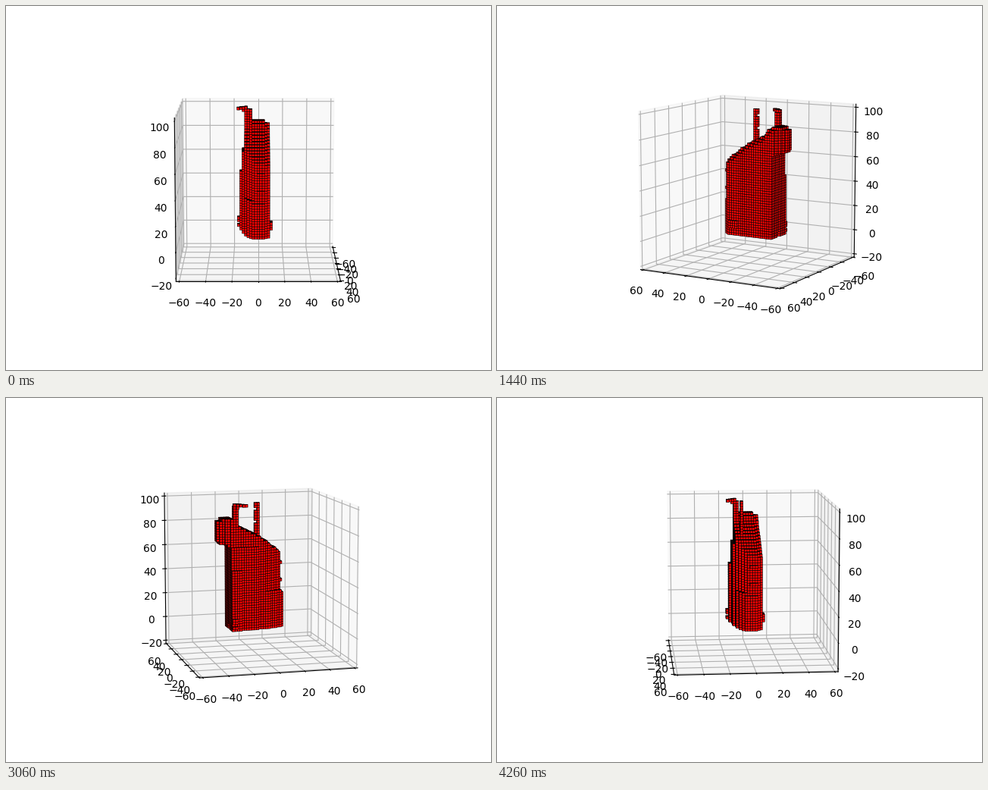
Recreate the animation shown at these times as a matplotlib script. Size 640 by 480 pixels, loop 4.32 s.

```python
import numpy as np
import matplotlib.pyplot as plt
from matplotlib.animation import FuncAnimation
from mpl_toolkits.mplot3d.art3d import Poly3DCollection

FRAMES, INTERVAL = 72, 60
ELEV = 10
HALF = 62.5          # half of the visible range, with a small margin
MID = np.array([0, 0, 40])
EYE_DIST = 1200


def build_solid():
    """Boolean grid of 2-unit cubes centred on even coordinates."""
    x, y, z = np.mgrid[-40:26:2, -22:18:2, -2:108:2]

    # Main body: sloped shoulder, tapered front
    top = np.interp(x, [-24, -20, -17, -11, -7, -2, 5, 13, 18],
                    [89, 86.5, 82, 79, 77, 74.5, 69.5, 63.5, 60])
    top = top - 2 * (y >= 6) - 2 * (y >= 8)
    low = np.interp(x, [-24, -10, 4, 12, 18], [-15, -13, -11, -9, -5])
    low = low + np.where(z > 30, 4 * np.clip(x / 16, 0, 1), 0)
    low = np.maximum(low, np.select([z < 50, z < 67], [-15, -13], -11))
    high = np.interp(x, [14, 16, 18], [9, 7, 5])
    front = np.where((z <= 28) | (z == 38) | (z == 52), 18, 16)
    body = ((x >= -24) & (x <= front) & (z > 0) & (z < top)
            & (y > low) & (y < high))
    body &= ~((x <= -8) & (z <= 4) & ((y == -4) | (y == -2)))

    # Head sticking out at the back
    roof = np.interp(x, [-34, -30], [87, 89]) - 2 * (y >= 6)
    floor = np.interp(x, [-34, -32, -28, -26], [71, 69, 69, 67])
    head = ((x >= -34) & (x < -24) & (z > floor) & (z < roof)
            & (y < np.interp(x, [-34, -25], [2, 9]))
            & (y > np.interp(x, [-34, -32, -26], [-5, -7, -9])))

    # Two posts and the diagonal hook on top
    thin = ((x == -2) | ((x == -4) & (z % 10 != 6))) & (y == -6)
    thin &= (z > 70) & (z <= 100)
    thick = ((x == -22) | (x == -20)) & ((y == -10) | (y == -8))
    thick &= (z > 76) & (z <= 98)
    step = (x + 22) // 2 + (y + 10) // 2
    hook = ((z == 100) & (x >= -22) & (x <= -14) & (y >= -16) & (y <= -10)
            & ((step == 0) | (step == 1)))
    hook |= (z == 98) & (x == -20) & (y == -12)

    # Loose cubes on the sides
    bumps = (y == 10) & (x >= 6) & (x <= 12) & (z >= 8) & (z <= 13)
    bumps |= ((y == -16) & (x <= -22) & (x >= -24)
              & ((z == 4) | (z == 8) | (z == 10)))

    return np.stack([x, y, z], -1), body | head | thin | thick | hook | bumps


def build_faces(points, solid):
    """Outer faces of the solid: quads, their centres and normals."""
    quads, centers, normals = [], [], []
    for axis in range(3):
        u, v = np.delete(np.eye(3), axis, 0)
        corners = np.array([-u - v, u - v, u + v, v - u])
        for side in (-1, 1):
            normal = side * np.eye(3)[axis]
            open_side = solid & ~np.roll(solid, -side, axis)
            mid = points[open_side] + normal
            centers.append(mid)
            quads.append(mid[:, None] + corners)
            normals.append(np.tile(normal, (len(mid), 1)))
    return map(np.concatenate, (quads, centers, normals))


quads, centers, normals = build_faces(*build_solid())

fig = plt.figure(figsize=(6.4, 4.8), dpi=100)
ax = fig.add_subplot(projection="3d")
ax.set_box_aspect((1, 1, 1), zoom=np.sqrt(3) / 1.8294640721620434)
ax.set_xticks(range(-60, 61, 20))
ax.set_yticks(range(-60, 61, 20))
ax.set_zticks(range(-20, 101, 20))
ax.set_xlim(-HALF, HALF)
ax.set_ylim(-HALF, HALF)
ax.set_zlim(MID[2] - HALF, MID[2] + HALF)

shell = Poly3DCollection(quads, facecolors="red", edgecolors="black",
                         linewidths=0.4)
ax.add_collection3d(shell)


def update(i):
    azim = 360 * i / FRAMES
    a, e = np.radians([azim, ELEV])
    # A tiny nudge settles which wall is drawn in square-on views
    ax.view_init(ELEV, azim + 1e-5 * (np.cos(a) - np.sin(a)))
    eye = MID + EYE_DIST * np.array(
        [np.cos(e) * np.cos(a), np.cos(e) * np.sin(a), np.sin(e)])
    facing = ((eye - centers) * normals).sum(1) > 0
    shell.set_verts(quads[facing])
    return shell,


anim = FuncAnimation(fig, update, frames=FRAMES, interval=INTERVAL,
                     init_func=lambda: update(0), repeat=True, blit=False)
plt.show()
```
